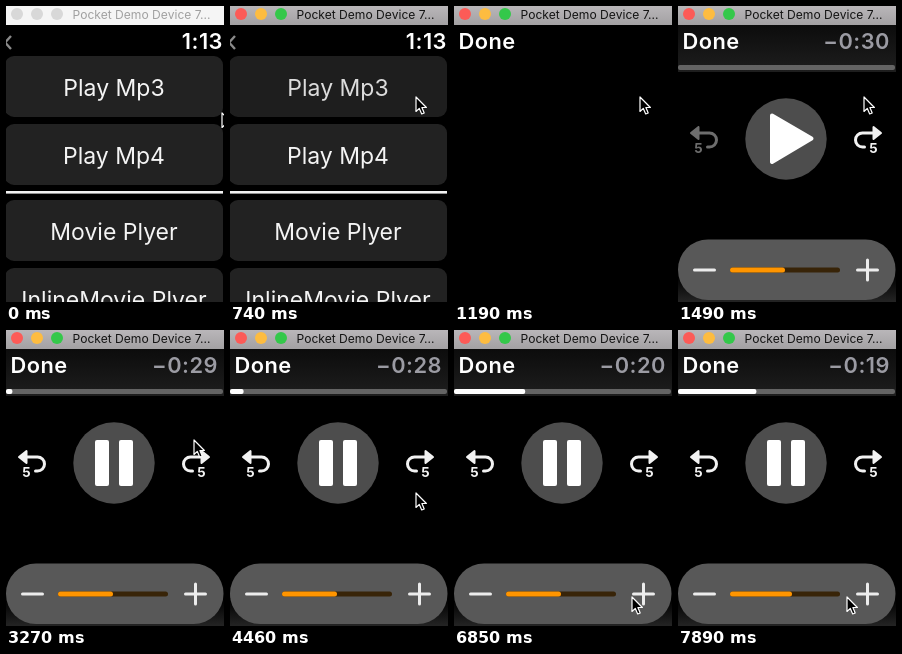
Write an HTML page that moves like this. It is 218 px wide and 296 px high and loops after 8 s.

```html
<!DOCTYPE html>
<html lang="en">
<head>
<meta charset="utf-8">
<title>Watch media player</title>
<style>
  html, body { margin: 0; width: 100%; height: 100%; overflow: hidden; background: #000; }
  svg { display: block; width: 100%; height: 100%; font-family: Inter, "Open Sans", sans-serif; }
  .label { font-size: 23px; fill: #f4f4f4; text-anchor: middle; }
  .head { font-size: 21.8px; font-weight: 600; fill: #fff; letter-spacing: .5px; }
  .five { font-size: 13.5px; font-weight: 700; fill: #f2f2f2; text-anchor: middle; }
</style>
</head>
<body>
<svg viewBox="0 0 218 296" xmlns="http://www.w3.org/2000/svg">
  <defs>
    <linearGradient id="barFill" x2="0" y2="1">
      <stop stop-color="#b9b6b9"/><stop offset="1" stop-color="#a3a1a3"/>
    </linearGradient>
    <linearGradient id="headFill" x2="0" y2="1">
      <stop stop-color="#0c0c0c"/><stop offset="1" stop-color="#1e1e1e"/>
    </linearGradient>
    <linearGradient id="footFill" x2="0" y2="1">
      <stop stop-color="#000"/><stop offset="1" stop-color="#242424"/>
    </linearGradient>
    <g id="curl">
      <path d="M19 127H31.500a7 7 0 0 1 0 14H29.500" fill="none" stroke="#f2f2f2" stroke-width="3" stroke-linecap="round"/>
      <path d="M13 127L20.500 121V133Z" fill="#f2f2f2" stroke="#f2f2f2" stroke-width="2" stroke-linejoin="round"/>
    </g>
  </defs>
  <rect width="218" height="296"/>

  <g id="list">
    <path d="M5 30L-1 36.500L5 43" fill="none" stroke="#8a8a8a" stroke-width="2.400"/>
    <text class="head" x="217" y="43" text-anchor="end">1:13</text>
    <g id="cards"></g>
    <rect y="185" width="217" height="2.600" fill="#f2f2f2"/>
  </g>

  <g id="sheet">
    <rect y="19" width="218" height="300"/>
    <rect id="shade" y="19" width="218" height="47" fill="url(#headFill)"/>
    <text class="head" x="4.500" y="43">Done</text>
    <g id="controls">
      <text id="left" class="head" x="212" y="43" text-anchor="end" style="fill:#9b9ba3"></text>
      <rect y="59" width="217" height="5" rx="2" fill="#646464"/>
      <rect id="played" y="59" height="5" rx="2" fill="#fff"/>
      <circle cx="108" cy="133" r="40.700" fill="#4d4d4d"/>
      <path id="play" d="M94 109.500L133.500 132.500L94 156Z" fill="#fff" stroke="#fff" stroke-width="4" stroke-linejoin="round"/>
      <g id="pause" fill="#fff">
        <rect x="89" y="110" width="14" height="46" rx="2"/>
        <rect x="113" y="110" width="14" height="46" rx="2"/>
      </g>
      <g id="back"><use href="#curl"/><text class="five" x="20.500" y="146.500">5</text></g>
      <g id="skip"><use href="#curl" transform="matrix(-1 0 0 1 216 0)"/><text class="five" x="195.500" y="146.500">5</text></g>
      <rect y="270" width="218" height="26" fill="url(#footFill)"/>
      <rect y="233.400" width="217.500" height="60.600" rx="30" fill="#585858"/>
      <g fill="none" stroke="#ececec" stroke-width="3" stroke-linecap="round">
        <path d="M16.500 264H36.500"/>
        <path id="plus" d="M179.500 264H199.500M189.500 254V274"/>
      </g>
      <rect x="52" y="261.500" width="110" height="5" rx="2.500" fill="#382408"/>
      <rect id="volume" x="52" y="261.500" height="5" rx="2.500" fill="#ff9500"/>
    </g>
  </g>

  <rect id="titlebar" width="218" height="19"/>
  <g id="lights"></g>
  <text id="title" x="66.500" y="13" font-size="12.100">Pocket Demo Device 7...</text>
  <path id="cursor" d="M0 0V14.500L3.300 11.400L5.700 17L8.200 16L5.900 10.500H10.400Z" fill="#000" stroke="#fff" stroke-width="1.200" stroke-linejoin="round"/>
</svg>
<script>
const LOOP = 8000, FIRST = 140, STEP = 149.04;
const $ = id => document.getElementById(id);
const set = (id, attrs) => {
  for (const k in attrs) $(id).setAttribute(k, attrs[k]);
};
const show = (id, on) => set(id, { visibility: on ? 'visible' : 'hidden' });

const ramp = (t, from, to) => Math.min(1, Math.max(0, (t - from) / (to - from)));
const smooth = p => p * p * (3 - 2 * p);
const press = (t, from, to) => 1 - .6 * Math.sin(Math.PI * ramp(t, from, to));

const hold = t => Math.max(0, FIRST + Math.floor((t - FIRST) / STEP) * STEP);

// Pointer moves: begin, end, then where it comes to rest.
const HOME = [216, 107];
const MOVES = [
  [0, 440, 186, 91],
  [2380, 2830, 188, 110],
  [3275, 3720, 186, 163],
  [4310, 4610, 191, 138],
  [6260, 6850, 178, 267],
  [7740, 7890, 169, 267]
];

function pointer(t) {
  let [x, y] = HOME;
  for (const [from, to, toX, toY] of MOVES) {
    const p = smooth(ramp(t, from, to));
    x += (toX - x) * p;
    y += (toY - y) * p;
  }
  return `translate(${x} ${y})`;
}

const LIGHTS = ['#fc5b57', '#fdbc40', '#34c84a'];
$('lights').innerHTML = LIGHTS.map((_, i) =>
  `<circle cx="${11 + i * 20}" cy="8" r="6"/>`).join('');

$('cards').innerHTML = [
  ['Play Mp3', 50], ['Play Mp4', 118], ['Movie Plyer', 194], ['InlineMovie Plyer', 262]
].map(([name, y]) =>
  `<g><rect x="-1" y="${y}" width="218" height="61" rx="9" fill="#222"/>
   <text class="label" x="108" y="${y + 40}">${name}</text></g>`).join('');

function draw(time) {
  const t = hold(time);
  const active = t >= 735;
  const playing = t >= 1620;
  const below = 277;
  const rise = below * (1 - ramp(t, 740, 1195)) ** 3.5;
  const skipped = t >= 5350 ? 5 : 0;
  const elapsed = Math.max(0, Math.floor((t - 1530) / 980)) + skipped;

  set('titlebar', { fill: active ? 'url(#barFill)' : '#f5f5f5' });
  set('title', { fill: active ? '#141414' : '#a0a0a0' });
  [...$('lights').children].forEach((c, i) => c.setAttribute('fill', active ? LIGHTS[i] : '#d8d8d8'));

  // The list drifts up more slowly than the sheet that covers it.
  set('list', { transform: `translate(0 ${(rise - below) * .151})` });
  $('cards').firstChild.setAttribute('opacity', active ? .9 : 1);
  set('sheet', { transform: `translate(0 ${rise})` });

  const fade = ramp(t, 1190, 1480);
  set('shade', { opacity: fade });
  set('controls', { opacity: fade });
  $('left').textContent = '\u22120:' + (30 - elapsed);
  set('played', { width: Math.max(0, elapsed * 7.2 - .8) });
  show('play', !playing);
  show('pause', playing);
  set('back', { opacity: t < 1775 ? .45 : 1 });
  set('skip', { opacity: press(t, 4800, 5500) });
  set('plus', { opacity: press(t, 7000, 7435) });
  set('volume', { width: 55 + 7 * ramp(t, 7150, 7435) });
  set('cursor', { transform: pointer(t) });
}

const start = performance.now();
function tick() {
  draw((performance.now() - start) % LOOP);
  requestAnimationFrame(tick);
}
tick();
</script>
</body>
</html>
```
